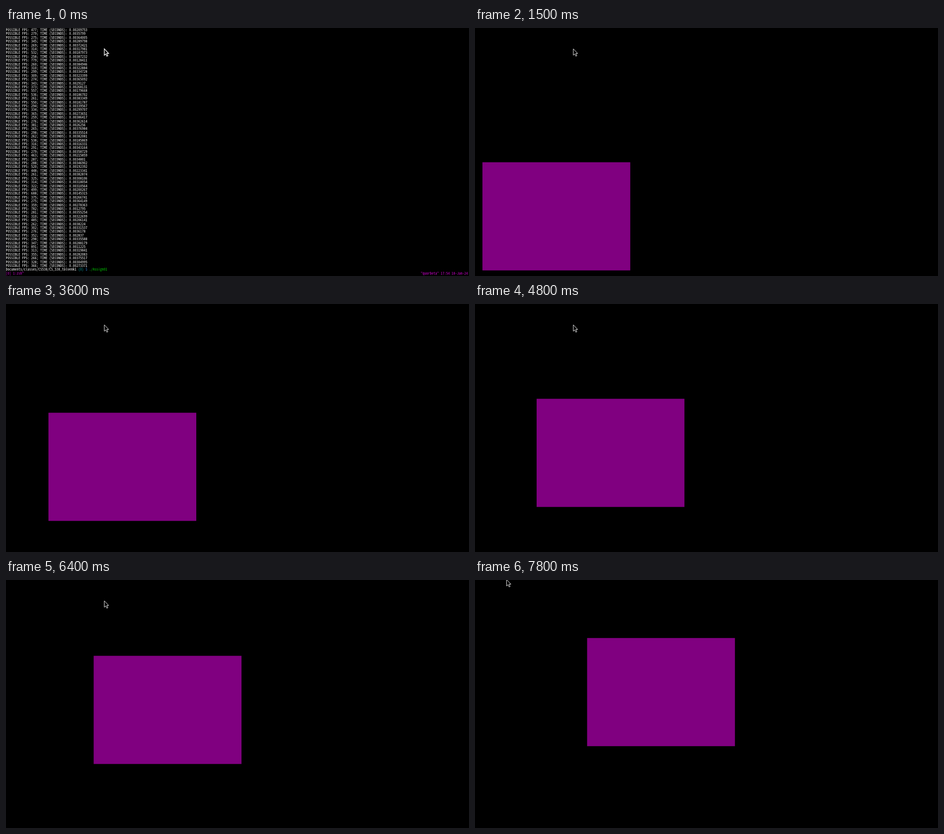
These frames come from a looping animation (1022 by 548 pixels, 8000 ms). An HTML page:

```html
<!DOCTYPE html>
<html lang="en">
<head>
<meta charset="utf-8">
<title>Moving box</title>
<style>
  html, body { margin: 0; width: 100%; height: 100%; overflow: hidden; background: #000; }
  svg { display: block; width: 1022px; height: 548px; }
  text { font-family: "Noto Sans Mono CJK JP", "Noto Sans Mono", monospace; white-space: pre; }
</style>
</head>
<body>
<svg viewBox="0 0 1022 548">
  <g id="terminal">
    <g id="rows"></g>
    <rect id="caret" width="4" height="8" fill="#e8e8e8" stroke="#e8e8e8"/>
  </g>
  <g id="window">
    <rect width="1022" height="548"/>
    <rect id="box" width="326.3" height="239" fill="#800080"/>
  </g>
  <path id="pointer" d="M0 0V14.2L3.2 11.3L5.5 16.3L7.8 15.3L5.5 10.3H9.6Z" fill="#000" stroke="#fff"/>
</svg>
<script>
const LOOP = 8000, TICK = 100;
const ROWS = 64, ROW_H = 8.405, CELL_W = 4, LEFT = -0.6, BASELINE = 6.9;
const WHITE = "#fff", MAGENTA = "#cd00cd";
const $ = id => document.getElementById(id);

const setAttrs = (node, attrs) => {
  for (const key in attrs) node.setAttribute(key, attrs[key]);
  return node;
};
const svgNode = (name, parent, attrs) =>
  parent.appendChild(setAttrs(document.createElementNS("http://www.w3.org/2000/svg", name), attrs));

let seed = 538;
const random = () => (seed = (seed * 16807) % 2147483647) / 2147483647;

const timing = seconds => `POSSIBLE FPS: ${Math.round(1 / seconds)}; TIME (SECONDS): ${seconds}`;
// Most passes take about 3 ms, one in five is quicker.
const randomTiming = () => {
  const [low, span] = random() < 0.2 ? [0.0011, 0.0013] : [0.0026, 0.0013];
  return timing(+(low + span * random()).toFixed(8));
};

const earlier = [
  ...Array.from({ length: 60 }, randomTiming),
  ...[0.00375517, 0.00304995, 0.00273371].map(timing)
];
const firstPasses = [0.00114609, 0.000850183, 0.00318772, 0.00257514, 0.00362564].map(timing);

const prompt = [
  ["Documents/classes/CS538/CS_538_tolvenk1", WHITE],
  [" (0)", "#0a9a9a"],
  [" $", "#2f7fd8"],
  [" ./Assign01", "#00d000"]
];

const stars = n => "*".repeat(n);
const output = `Number of command line arguments: 0
GLEW initialized; version 2.2.0
OpenGL context version: 4.3
Supported GLSL version is 4.30 NVIDIA via Cg compiler
${stars(23)}
** VERTEX SHADER CODE **
${stars(23)}
#version 430 core
// Change to 410 for macOS

layout(location=0) in vec3 position;
layout(location=1) in vec2 texcoords;

out vec4 vertexColor;
out vec2 interUV;

void main()
{
        // Get position of vertex (object space)
        vec4 objPos = vec4(position, 1.0);

        // For now, just pass along vertex position (no transformations)
        gl_Position = objPos;

        // Output UV coordinates
        interUV = texcoords;
}

${stars(25)}
** FRAGMENT SHADER CODE **
${stars(25)}
#version 430 core
// Change to 410 for macOS

layout(location=0) out vec4 out_color;

in vec4 vertexColor; // Now interpolated across face
in vec2 interUV;

uniform sampler2D quadTexture;

void main()
{
        // Just output interpolated color
        vec3 texColor = vec3(texture(quadTexture, interUV));
        out_color = vec4(texColor, 1.0f);
}

${stars(25)}
Vertex shader: Compiling shader...
Fragment shader: Compiling shader...
Linking program...
Program successfully compiled and linked!
currentBox 0 Y 0`.split("\n");

const log = [...earlier, prompt, ...output, ...firstPasses];
const promptEnd = earlier.length + 1;

// Choose the font size whose character advance is one terminal cell.
const probe = document.createElement("canvas").getContext("2d");
probe.font = "100px " + getComputedStyle(svgNode("text", $("rows"))).fontFamily;
$("terminal").setAttribute("font-size", CELL_W * 100 / probe.measureText("0").width);

const textAt = (column, row, fill, text = "") => {
  const node = svgNode("text", $("rows"), { x: LEFT + column * CELL_W, y: BASELINE + row * ROW_H, fill });
  node.textContent = text;
  return node;
};
const rows = Array.from({ length: ROWS }, (_, i) => textAt(0, i, WHITE));
textAt(0, ROWS, MAGENTA, "[0] 1:zsh*");
textAt(229, ROWS, MAGENTA, '"quorbeta" 17:54 18-Jan-24');

let shownCount = -1;
function showLog(count) {
  if (count === shownCount) return;
  shownCount = count;
  const lines = log.slice(0, count);
  if (count > promptEnd) lines.push("");
  lines.slice(-ROWS).forEach((line, i) => {
    rows[i].textContent = "";
    const parts = Array.isArray(line) ? line : [[line, WHITE]];
    for (const [text, fill] of parts) svgNode("tspan", rows[i], { fill }).textContent = text;
  });
}

function logLength(t) {
  if (t < 800) return promptEnd;
  if (t < 1000) return promptEnd + (t - 700) / TICK;
  return t < 1100 ? promptEnd + output.length : log.length;
}

// The picture refreshes in bursts and holds still between them: [first, last, box x at first].
const SPEED = 0.0334;
const bursts = [
  [0, 2500, -33.7], [2600, 2600, 54], [3600, 3600, 93.7], [3800, 3900, 96.2], [4800, 5000, 136],
  [5700, 5900, 167], [6400, 6600, 193.5], [7000, 7200, 213.8], [7400, 7400, 232.5], [7600, 7800, 240.8]
];

function draw(time) {
  const t = Math.floor(time / TICK) * TICK;
  const [first, last, firstX] = bursts.findLast(burst => burst[0] <= t);
  const shown = Math.min(t, last);

  showLog(logLength(t));
  const running = t >= 800;
  const fade = Math.min(1, Math.max(0, (t - 875) / 360));
  $("window").setAttribute("opacity", fade);
  $("terminal").setAttribute("display", fade < 1 ? "inline" : "none");
  setAttrs($("caret"), {
    x: LEFT + (running ? 0.4 : 56 * CELL_W),
    y: 530.3,
    "fill-opacity": running ? 0 : 1,
    "stroke-width": running ? 0.5 : 0,
    display: t >= 500 ? "inline" : "none"
  });

  const x = firstX + (shown - first) * SPEED;
  setAttrs($("box"), { x, y: 308.6 - 0.729 * x, display: t >= 1100 ? "inline" : "none" });

  const away = Math.max(0, (shown - 7200) / 600) ** 1.85;
  setAttrs($("pointer"), {
    transform: `translate(${217 - 147.3 * away} ${46 - 47 * away})`,
    "stroke-width": fade < 1 ? 1.4 : 1
  });
}

const start = performance.now();
function frame() {
  draw((performance.now() - start) % LOOP);
  requestAnimationFrame(frame);
}
draw(0);
requestAnimationFrame(frame);
</script>
</body>
</html>
```
